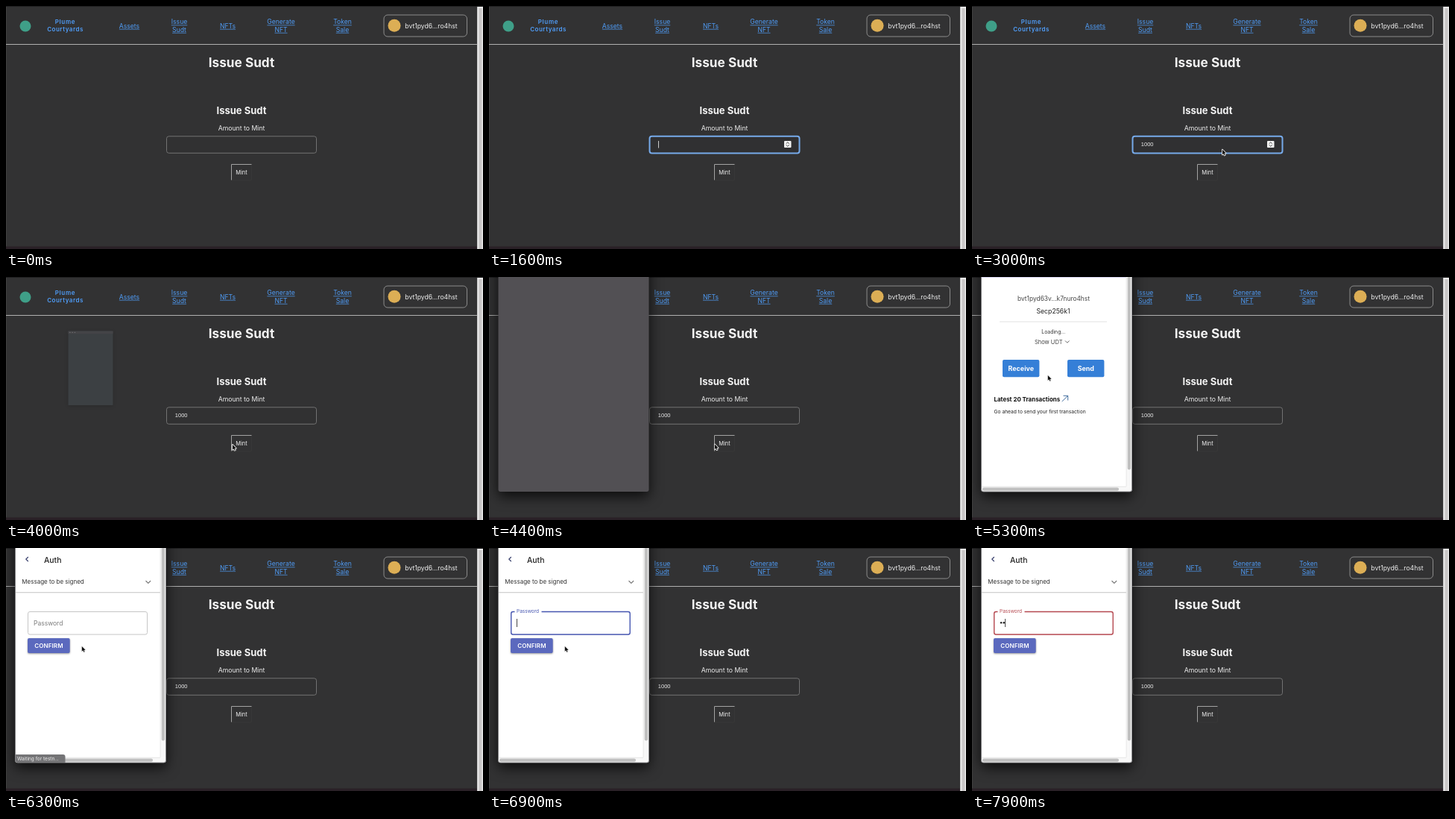
An HTML page with a canvas that plays this animation: 640x326 px, repeating every 8 s.

```html
<!DOCTYPE html>
<html lang="en">
<head>
<meta charset="utf-8">
<title>Issue Sudt</title>
<style>
html, body { margin: 0; width: 100%; height: 100%; overflow: hidden; background: #323233; }
canvas { display: block; width: 100vw; height: 100vh; }
</style>
</head>
<body>
<canvas id="stage"></canvas>
<script>
const W = 640, H = 326, LOOP = 8000;
const LINK = '#4f9df8';
const UI_FONT = 'Inter, "Open Sans", sans-serif';
const FIELD_FONT = '"Liberation Sans", Arial, sans-serif';
const canvas = document.getElementById('stage');
const ctx = canvas.getContext('2d');

const clamp = v => Math.max(0, Math.min(1, v));
const progress = (t, from, to) => clamp((t - from) / (to - from));
const easeOut = p => 1 - (1 - p) ** 3;
const easeInOut = p => p * p * (3 - 2 * p);
const mix = (a, b, p) => a + (b - a) * p;
const between = (t, from, to) => t >= from && t < to;

function rect(x, y, w, h, color) {
  ctx.fillStyle = color;
  ctx.fillRect(x, y, w, h);
}

function roundRect(x, y, w, h, r, fill, stroke, lineWidth = 1) {
  ctx.beginPath();
  ctx.roundRect(x, y, w, h, r);
  if (fill) {
    ctx.fillStyle = fill;
    ctx.fill();
  }
  if (stroke) {
    ctx.strokeStyle = stroke;
    ctx.lineWidth = lineWidth;
    ctx.stroke();
  }
}

function line(points, color, width = 1) {
  ctx.beginPath();
  points.forEach(([x, y]) => ctx.lineTo(x, y));
  ctx.strokeStyle = color;
  ctx.lineWidth = width;
  ctx.stroke();
}

function dot(x, y, r, color) {
  ctx.beginPath();
  ctx.arc(x, y, r, 0, Math.PI * 2);
  ctx.fillStyle = color;
  ctx.fill();
}

function text(str, x, y, size, color, { weight = 400, align = 'left', spacing = 0, font = UI_FONT } = {}) {
  ctx.font = `${weight} ${size}px ${font}`;
  ctx.textAlign = align;
  ctx.letterSpacing = spacing + 'px';
  ctx.fillStyle = color;
  ctx.fillText(str, x, y);
  return ctx.measureText(str).width;
}

function centered(str, x, y, size, color, weight = 400, spacing = 0) {
  return text(str, x, y, size, color, { weight, spacing, align: 'center' });
}

function withShadow(color, blur, dy, draw) {
  ctx.save();
  ctx.shadowColor = color;
  ctx.shadowBlur = blur * canvas.width / W;
  ctx.shadowOffsetY = dy * canvas.height / H;
  draw();
  ctx.restore();
}

function link(str, x, y) {
  const w = centered(str, x, y, 8.6, LINK);
  rect(x - w / 2, y + 1.1, w, 0.7, LINK);
}

function pointer(x, y) {
  ctx.beginPath();
  [[0, 0], [0, 8.6], [2, 6.8], [3.3, 9.8], [4.7, 9.2], [3.4, 6.3], [6, 6.2]]
    .forEach(([dx, dy]) => ctx.lineTo(x + 0.5 + dx * 0.8, y + 0.9 + dy * 0.8));
  ctx.closePath();
  ctx.lineJoin = 'round';
  ctx.strokeStyle = '#f2f2f2';
  ctx.lineWidth = 1.7;
  ctx.stroke();
  ctx.fillStyle = '#111';
  ctx.fill();
  ctx.lineJoin = 'miter';
}

function header() {
  dot(26, 27, 7.5, '#3f9f88');
  centered('Plume', 79.5, 24.1, 8, LINK, 600, 0.7);
  centered('Courtyards', 79.5, 34.4, 8, LINK, 600, 0.5);
  link('Assets', 165.5, 29.7);
  link('Issue', 232.5, 24.4);
  link('Sudt', 232.5, 34.7);
  link('NFTs', 297.5, 29.7);
  link('Generate', 369, 24.4);
  link('NFT', 369, 34.7);
  link('Token', 451.5, 24.4);
  link('Sale', 451.5, 34.7);
  roundRect(507, 12, 111.5, 29, 5, null, '#8b8b8b');
  dot(521, 26.3, 8.5, '#dcae55');
  text('bvt1pyd6...ro4hst', 535.3, 29.5, 8.65, '#eeeeee');
  rect(0, 51, 632, 1, '#b0b0b0');
}

function amountField(t) {
  const focused = between(t, 1000, 3700);
  if (focused) {
    roundRect(215.5, 174.7, 201, 22.8, 3, '#303032', '#76aaea', 2);
    roundRect(396, 181, 9.5, 9, 1, '#f2f2f2');
    line([[398.7, 184.7], [400.7, 182.8], [402.7, 184.7]], '#444');
    line([[398.7, 186.4], [400.7, 188.3], [402.7, 186.4]], '#444');
  } else {
    roundRect(215.5, 174.8, 201, 22.5, 3, '#313132', '#727272');
  }

  const typed = '1000'.slice(0, [1700, 1900, 2000, 2200].filter(at => t >= at).length);
  const w = text(typed, 226.8, 188.2, 7.5, '#eeeeee', { font: FIELD_FONT });
  const caretOn = between(t, 1000, 2650) || between(t, 3150, 3650);
  if (focused && caretOn) rect(227 + w, 181, 0.9, 9.5, '#dddddd');
}

function page(t) {
  rect(0, 0, W, H, '#323233');
  rect(0, 0, W, 1, '#1f1f20');
  rect(0, 1, 0.7, 322, '#454546');
  rect(0, 322.5, 632, 3.5, '#2a2127');
  rect(632, 1, 8, 325, '#e9e9e9');
  rect(632, 1, 1, 325, '#c9c9c9');
  rect(634.5, 3, 4, 323, '#c8c6c6');

  header();
  centered('Issue Sudt', 316, 81.9, 17.2, '#f3f3f3', 700);
  centered('Issue Sudt', 316, 144.7, 13, '#f3f3f3', 700);
  centered('Amount to Mint', 316, 167.2, 8.7, '#eeeeee');
  amountField(t);

  roundRect(302.5, 212.5, 27, 21.5, 2, null, '#383838');
  line([[302.5, 233.5], [302.5, 212.5], [329.5, 212.5]], '#a3a3a3');
  centered('Mint', 316, 226, 7.4, '#f0f0f0');
}

function growingWindow(t) {
  const p = easeInOut(progress(t, 3900, 4300));
  const s = t < 4000 ? 0.2 : mix(0.29, 1, easeOut(progress(t, 4000, 4300)));
  const w = 202 * s, h = 335 * s;
  const x = 113.5 - w / 2, y = mix(122.7, 120.5, p) - h / 2;
  const shade = (a, b) => Math.round(mix(a, b, p));
  withShadow(`rgba(0,0,0,${0.05 + 0.75 * p})`, 3 + 15 * p, 6 * p, () =>
    roundRect(x, y, w, h, 3 * s, `rgb(${shade(56, 82)},${shade(61, 80)},${shade(64, 84)})`));
  rect(x, y, w, 12 * s, '#444447');
  for (let i = 0; i < 3; i++) dot(x + (8 + i * 11) * s, y + 6 * s, 2.5 * s, '#77777a');
}

function walletHome(t) {
  if (t >= 4700) {
    rect(12, 0, 195, 1, '#d3d0ec');
    centered('bvt1pyd63v...k7nuro4hst', 109.5, 32, 8.4, '#444');
    centered('Secp256k1', 109, 49.4, 8.7, '#222');
    rect(37, 59.6, 144, 0.8, '#d9d9d9');
  }
  if (t >= 4800) {
    centered('Loading...', 109.3, 75.6, 6.9, '#333');
    text('Show UDT', 84, 89.7, 7.5, '#444');
    line([[125, 85.5], [127.8, 88.3], [130.6, 85.5]], '#555', 0.9);
    [['Receive', 41], ['Send', 128]].forEach(([label, x]) => {
      roundRect(x, 111, 49.4, 23.2, 2, '#357fd7');
      centered(label, x + 24.8, 125.7, 8.9, '#fff', 700);
    });
    text('Latest 20 Transactions', 29.5, 166.7, 7.95, '#111', { weight: 700 });
    line([[120.7, 167], [128.5, 159.5]], '#2f5f95', 0.9);
    line([[122.5, 159.3], [128.7, 159.3], [128.7, 165.5]], '#2f5f95', 0.9);
  }
  if (t >= 5000) text('Go ahead to send your first transaction', 29.5, 183.3, 6.7, '#222');
}

function passwordField(t) {
  const focused = t >= 6900;
  if (!focused) {
    roundRect(29.5, 85.5, 160, 30.5, 2.5, null, '#c6c6c6');
    text('Password', 37, 103.5, 8.5, '#7c7c7c');
    return;
  }
  const color = t >= 7600 ? '#b5474f' : '#4555b0';
  roundRect(29.7, 85.5, 159.5, 30.5, 2.5, null, color, 1.4);
  rect(34.5, 83.5, 36, 4, '#fff');
  text('Password', 37, 87.3, 6.5, color);

  const count = (t >= 7600) + (t >= 7800);
  for (let i = 0; i < count; i++) dot(39.1 + i * 3.7, 100.3, 1.25, '#222');
  const caretOn = t >= 7600 || between(t, 6900, 7400);
  if (caretOn) rect(37 + count * 3.6, 95, 0.9, 11, '#333');
}

function authForm(t) {
  line([[29.8, 12], [26.8, 15], [29.8, 18]], '#3d4470', 1.2);
  text('Auth', 51, 19.8, 10.4, '#222', { weight: 500 });
  text('Message to be signed', 21.3, 48.2, 8, '#333');
  line([[187.5, 44], [190.8, 47.2], [194.1, 44]], '#777', 1.1);
  rect(12.5, 59, 194.5, 0.8, '#bdbdbd');
  rect(12.5, 59.8, 194.5, 0.8, '#e8e8e8');
  passwordField(t);
  withShadow('rgba(0,0,0,.4)', 2.5, 1, () => roundRect(29, 121, 56.7, 20, 2, '#5b69be'));
  centered('CONFIRM', 57.5, 134, 8, '#fff', 600, 0.1);
}

function popup(t) {
  if (t < 4500) {
    growingWindow(t);
    return;
  }
  const frame = [12.5, -47, 202, 335, 3];
  withShadow('rgba(0,0,0,.8)', 18, 6, () => roundRect(...frame, '#fff'));
  ctx.save();
  ctx.beginPath();
  ctx.roundRect(...frame);
  ctx.clip();
  if (t < 5800) walletHome(t);
  else authForm(t);

  rect(207, 0, 8, 289, '#f8f8f8');
  rect(206.7, 0, 0.8, 281, '#e2e2e2');
  rect(12, 280.8, 203, 8, '#f8f8f8');
  rect(12, 280.8, 195, 0.8, '#e2e2e2');
  roundRect(208.7, -20, 4.3, 278.5, 2, '#c0c0c0');
  roundRect(14, 282.4, 183, 4.3, 2, '#c0c0c0');
  if (between(t, 6000, 6800)) {
    roundRect(12, 277, 67.5, 12, [0, 3, 0, 0], '#747476');
    text('Waiting for testn...', 15, 285, 6.5, '#eeeeee');
  }
  ctx.restore();
  roundRect(...frame, null, '#858587', 0.9);
}

function pointerAt(t) {
  if (t < 4400) {
    const p = easeInOut(progress(t, 2900, 3500));
    return [mix(338, 303.5, p), mix(189, 224, p)];
  }
  const p = easeOut(progress(t, 4400, 4900));
  return [mix(303.5, 101.3, p), mix(224, 131, p)];
}

function draw(t) {
  const ratio = window.devicePixelRatio || 1;
  const w = Math.round(innerWidth * ratio), h = Math.round(innerHeight * ratio);
  if (canvas.width !== w || canvas.height !== h) {
    canvas.width = w;
    canvas.height = h;
  }
  ctx.setTransform(w / W, 0, 0, h / H, 0, 0);
  page(t);
  if (t >= 3900) popup(t);
  if (between(t, 2900, 7600)) pointer(...pointerAt(t));
}

const start = performance.now();
function tick() {
  draw((performance.now() - start) % LOOP);
  requestAnimationFrame(tick);
}
tick();
</script>
</body>
</html>
```
